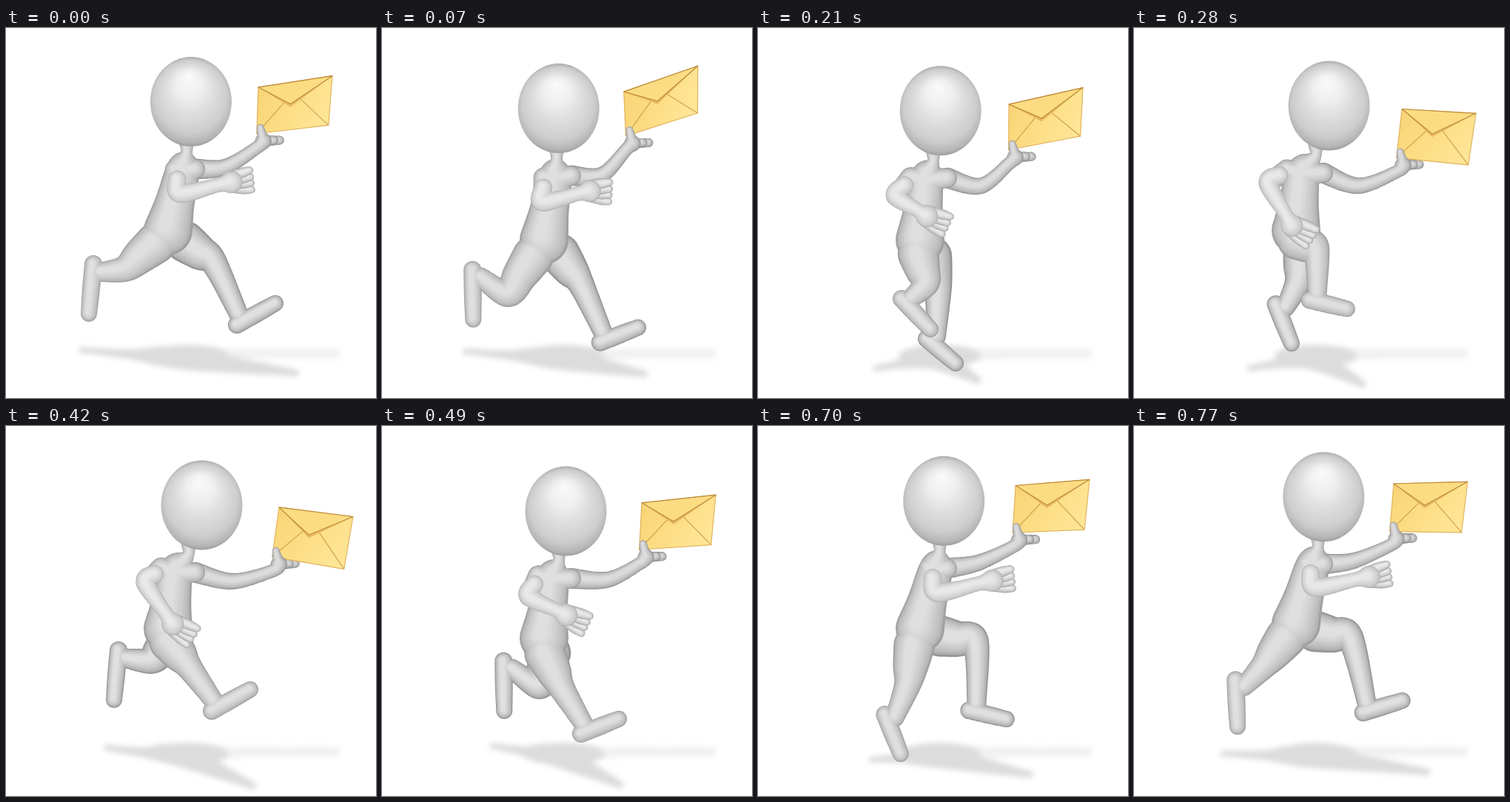
These frames come from a looping animation (500 px wide and 500 px high, 0.84 s). An HTML page with a canvas:

```html
<!DOCTYPE html>
<html lang="en">
<head>
<meta charset="utf-8">
<title>Running with a letter</title>
<style>
html, body { margin: 0; width: 100%; height: 100%; overflow: hidden; background: #fff; }
canvas { display: block; }
</style>
</head>
<body>
<canvas id="stage" width="500" height="500"></canvas>
<script>
const ctx = document.getElementById('stage').getContext('2d');
const STEP = 70, STEPS = 12;
const { cos, sin, PI } = Math;

const mix = (a, b, t) => [a[0] + (b[0] - a[0]) * t, a[1] + (b[1] - a[1]) * t];
const add = (p, x, y) => [p[0] + x, p[1] + y];
const spline = (a, b, c, d, t) =>
  b + t / 2 * (c - a + t * (2 * a - 5 * b + 4 * c - d + t * (3 * (b - c) + d - a)));

// Periodic motion: mean plus cosine and sine parts of the stride and its overtones.
const wave = (p, mean, c1, s1, c2 = 0, s2 = 0, c3 = 0) =>
  mean + c1 * cos(p) + s1 * sin(p) + c2 * cos(2 * p) + s2 * sin(2 * p) + c3 * cos(3 * p);

// Both legs share one stride, half a cycle apart.
function legPose(phase, far) {
  const p = far ? phase + PI : phase;
  const x = (far ? 34 : 0) - 8 * sin(phase);
  const y = 8 * cos(phase) - 5 * sin(phase);
  return {
    side: far ? 10 : -4,
    knee: [x + wave(p, 215, -43, 9, -11, -4), wave(p, far ? 333 : 341, 10, -12, -16, 27, -10)],
    heel: [x + wave(p, 200, -80, 0, -2, -4), y + wave(p, 375, -41, -27, -23, 9)],
    toe: [x + wave(p, 231, -109, 0, -10, -5), y + wave(p, 403, 7, -23, -32, 9)]
  };
}

function poseAt(phase) {
  const bob = wave(phase, 0, 0, 0, -5.3, 9.3);
  const swing = cos(phase + 0.75), lift = cos(phase + 0.5);
  const palm = [265 + 54 * swing, 238 - 34 * lift];
  const tilt = -12 - 14 * cos(phase) - 2 * bob;
  const topLeft = [347 - 14 * cos(phase) - 1.5 * bob, 95 - 17 * lift];
  return {
    head: [wave(phase, 250.5, -7.3, 2.9) - 1.27 * bob, 107.5 - 3.7 * cos(phase) + 0.8 * bob],
    belly: [219, 280 + 1.2 * bob],
    shoulder: [217 + 13 * swing - 0.4 * bob, 197 + bob],
    elbow: [210 + 32 * swing - 0.4 * bob, 225 + 8 * swing + 1.4 * bob],
    palm,
    tips: add(palm, 26, 7 - 11 * lift),
    farElbow: [301 - 5 * cos(phase), 201 - 15 * swing + 0.4 * bob],
    topLeft,
    topRight: add(topLeft, 100, tilt),
    bottomLeft: add(topLeft, -6 - tilt / 4, 65 + 0.15 * tilt),
    shadowBack: [wave(phase, 143, -17, -8, -24), wave(phase, 445, 0, 5, -10, -6)],
    shadowFront: [wave(phase, 338, 29, -17, 24, -14), 476 - 10 * cos(phase)]
  };
}

// Adds a smooth tapered limb through [x, y, radius] points.
function trace(limb, scale = 1, shift = 0) {
  for (let i = 0; i < limb.length - 1; i++) {
    const pts = [limb[Math.max(i - 1, 0)], limb[i], limb[i + 1], limb[Math.min(i + 2, limb.length - 1)]];
    for (let t = 0; t <= 1; t += 1 / 24) {
      const [x, y, r] = [0, 1, 2].map(n => spline(...pts.map(p => p[n]), t));
      const cx = x - r * shift, cy = y - r * shift, radius = Math.max(r * scale, 0.5);
      ctx.moveTo(cx + radius, cy);
      ctx.arc(cx, cy, radius, 0, 7);
    }
  }
}

// Fills limbs as one rounded volume, dark rim to light core.
function tube(limbs, rim, lit) {
  const layers = 10;
  for (let k = 0; k < layers; k++) {
    const depth = k / (layers - 1), v = Math.round(rim + (lit - rim) * Math.sqrt(depth));
    ctx.fillStyle = `rgb(${v},${v},${v})`;
    ctx.beginPath();
    limbs.forEach(limb => trace(limb, 1 - 0.75 * depth, 0.15 * depth));
    ctx.fill();
  }
}

function poly(points, fill, line) {
  ctx.beginPath();
  points.forEach(p => ctx.lineTo(...p));
  if (fill) {
    ctx.closePath();
    ctx.fillStyle = fill;
    ctx.fill();
  }
  if (line) {
    ctx.strokeStyle = line;
    ctx.stroke();
  }
}

function drawShadow(back, front) {
  ctx.save();
  ctx.filter = 'blur(3.5px)';
  ctx.beginPath();
  trace([[250, 444, 10], [340, 440, 7], [445, 440, 7]]);
  ctx.fillStyle = '#f1f1f1';
  ctx.fill();
  ctx.beginPath();
  trace([[...back, 4], [...mix(back, [235, 447], 0.5), 7], [240, 447, 15], [...front, 5]]);
  ctx.ellipse(245, 443, 55, 15, 0, 0, 7);
  ctx.fillStyle = '#dcdcdc';
  ctx.fill();
  ctx.restore();
}

function drawLetter({ topLeft: tl, topRight: tr, bottomLeft: bl }) {
  const br = [tr[0] + bl[0] - tl[0] - 3, tr[1] + bl[1] - tl[1] + 4];
  const at = (u, v) => mix(mix(tl, tr, u), mix(bl, br, u), v);
  const tip = at(0.45, 0.46);
  const paper = ctx.createLinearGradient(...tl, ...br);
  paper.addColorStop(0, '#f9d476');
  paper.addColorStop(0.6, '#fde08a');
  paper.addColorStop(1, '#ffe79a');
  ctx.lineJoin = 'round';
  ctx.lineWidth = 1.2;
  poly([tl, tr, br, bl], paper, '#e0b35c');
  poly([bl, at(0.48, 0.22), br], null, '#d3a34e');
  poly([tl, add(tip, 0, 4), tr], '#e6ba62');
  poly([tl, tip, tr], '#fbdc82', '#bd8a3b');
}

function leg({ knee, heel, toe, side }, belly) {
  const [dx, dy] = [toe[0] - heel[0], toe[1] - heel[1]], size = Math.hypot(dx, dy);
  const ankle = add(mix(heel, toe, 0.15), dy / size * 11, -dx / size * 11);
  const hip = add(mix(belly, knee, 0.22), side, 6);
  return [
    [[...hip, 28], [...mix(hip, knee, 0.5), 24], [...knee, 18], [...ankle, 13]],
    [[...heel, 12], [...mix(heel, toe, 0.5), 12], [...toe, 11]]
  ];
}

function drawHead([x, y]) {
  const shade = ctx.createRadialGradient(x - 3, y - 34, 0, x, y, 61);
  [[0, '#fafafa'], [0.3, '#efefef'], [0.5, '#e0e0e0'], [0.8, '#cdcdcd'], [0.94, '#b5b5b5'], [1, '#9b9b9b']]
    .forEach(stop => shade.addColorStop(...stop));
  ctx.fillStyle = shade;
  ctx.beginPath();
  ctx.ellipse(x, y, 55, 60.5, 0, 0, 7);
  ctx.fill();
}

function drawNearArm({ shoulder, elbow, palm, tips }) {
  const [dx, dy] = [tips[0] - palm[0], tips[1] - palm[1]], size = Math.hypot(dx, dy);
  for (const spread of [13, 4, -4, -13]) {
    const end = add(tips, -dy / size * spread, dx / size * spread);
    const root = add(palm, -dy / size * spread * 0.6, dx / size * spread * 0.6);
    tube([[[...root, 7], [...mix(root, end, 0.6), 7], [...end, 5]]], 160, 232);
  }
  const upper = mix(shoulder, elbow, 0.4), wrist = mix(elbow, palm, 0.75);
  tube([[[...upper, 12], [...elbow, 13], [...wrist, 10], [...palm, 15]]], 182, 232);
}

function draw(step) {
  const phase = step / STEPS * 2 * PI, pose = poseAt(phase);
  const { head, belly, shoulder, elbow, farElbow, bottomLeft } = pose;
  const farShoulder = [256, head[1] + 91];
  const chest = add(mix(shoulder, farShoulder, 0.5), -4, 3);
  const neck = [mix(head, chest, 0.5)[0], mix(head, chest, 0.73)[1]];
  const hand = add(bottomLeft, 9, 10), wrist = add(hand, -9, 9);

  ctx.fillStyle = '#fff';
  ctx.fillRect(0, 0, 500, 500);
  drawShadow(pose.shadowBack, pose.shadowFront);

  for (const reach of [22, 14]) {
    tube([[[...add(hand, 3, 0), 7], [...add(hand, reach, -1), 6]]], 140, 215);
  }
  drawLetter(pose);
  tube([
    [[...farShoulder, 14], [...farElbow, 11], [...wrist, 9], [...hand, 11]],
    [[...hand, 8], [...add(hand, -4, -18), 5]]
  ], 148, 220);

  tube(leg(legPose(phase, true), belly), 148, 224);
  tube([
    [[...add(neck, 0, -14), 10], [...neck, 8], [...mix(neck, chest, 0.5), 14], [...chest, 23],
      [...mix(chest, belly, 0.55), 27], [...belly, 33]],
    [[...shoulder, 14], [...chest, 16], [...farShoulder, 13]],
    [[...shoulder, 14], [...elbow, 13]],
    ...leg(legPose(phase, false), belly)
  ], 160, 223);
  drawHead(head);
  drawNearArm(pose);
}

let shown = -1;
function tick() {
  const step = Math.floor(performance.now() / STEP) % STEPS;
  if (step !== shown) draw(shown = step);
  requestAnimationFrame(tick);
}
tick();
</script>
</body>
</html>
```
